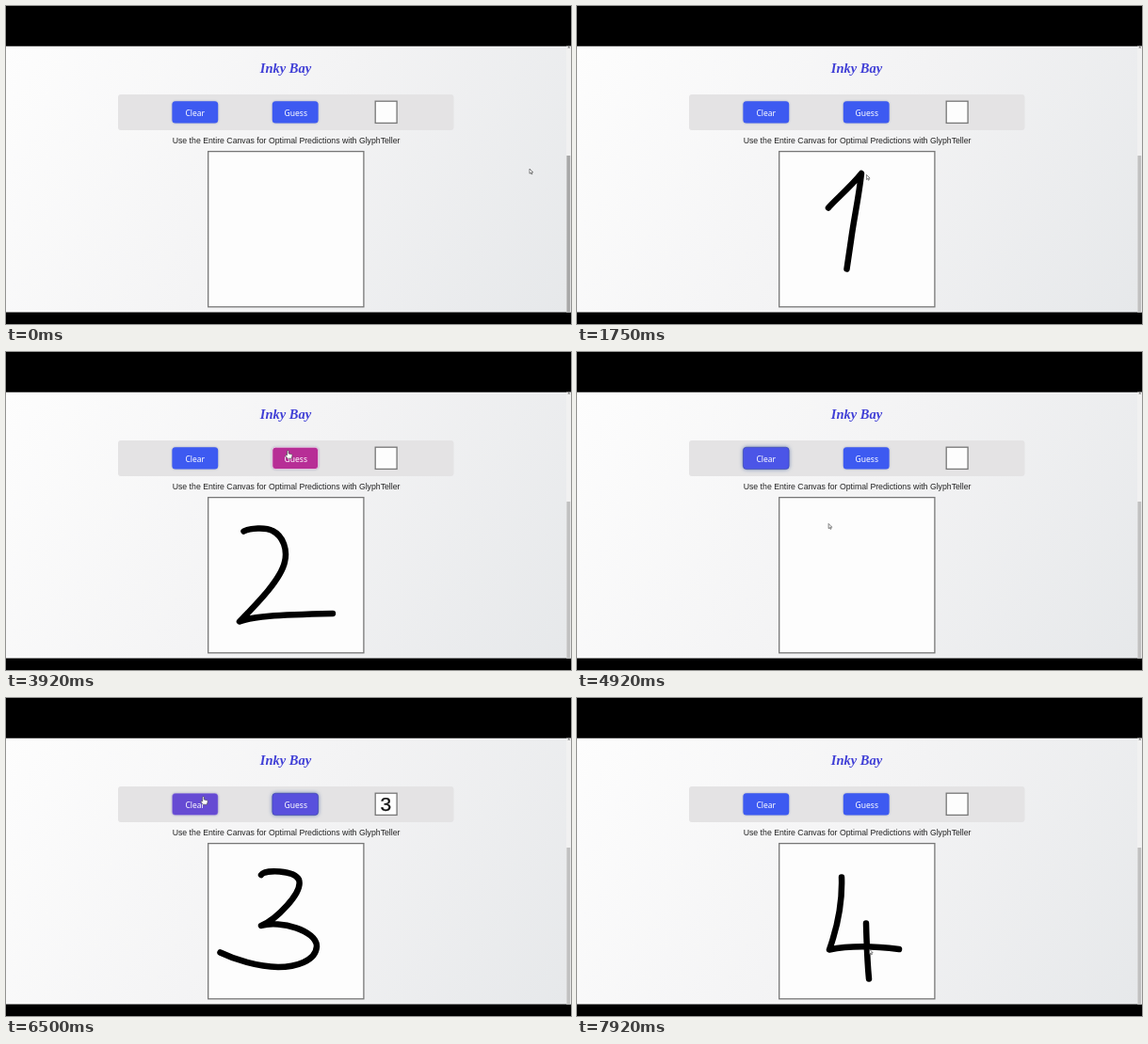
These frames come from a looping animation (600 by 338 pixels, 8000 ms). An HTML page:

```html
<!DOCTYPE html>
<html lang="en">
<head>
<meta charset="utf-8">
<title>Digit drawing pad</title>
<style>
html, body { margin: 0; width: 100%; height: 100%; overflow: hidden; background: #000; }
#stage { position: relative; width: 600px; height: 338px; overflow: hidden; }
#page { position: absolute; top: 42px; width: 600px; height: 284px; background: linear-gradient(120deg, #fdfdfd, #f3f3f4 50%, #e6e8ea); }
svg { position: absolute; left: 0; top: 0; }
.box { fill: #fdfdfd; stroke: #777; stroke-width: 1.3; }
.label { font: 8.5px "Noto Sans", "Open Sans", sans-serif; fill: #fff; text-anchor: middle; }
.sans { font: 8.73px "Liberation Sans", Arial, sans-serif; fill: #222; }
.title { font: italic bold 14.5px "Liberation Serif", serif; fill: #403fd6; text-anchor: middle; }
#digit { font-size: 21px; fill: #111; stroke: #111; stroke-width: .25; text-anchor: middle; }
.pen { fill: none; stroke: #000; stroke-width: 6.5; stroke-linecap: round; stroke-linejoin: round; }
#cursor path { fill: #fff; stroke: #444; stroke-width: .65; stroke-linejoin: round; }
</style>
</head>
<body>
<div id="stage">
  <div id="page"></div>
  <svg width="600" height="338" viewBox="0 0 600 338">
    <path d="M0 0H600V42.7H0ZM0 325.4H600V338H0Z"/>
    <rect x="595" y="42.7" width="5" height="282.7" fill="#f1f1f1"/>
    <rect id="thumb" x="595.4" y="159" width="3.8" height="166.4"/>
    <path d="M596.3 44.6l1.5-1.6 1.5 1.6z" fill="#555"/>
    <rect x="119" y="94" width="356.5" height="38" rx="3" fill="#e4e3e4"/>
    <rect id="clear" x="176.4" y="101.2" width="48.8" height="23.4" rx="3.5"/>
    <rect id="guess" x="282.8" y="101.2" width="48.8" height="23.4" rx="3.5"/>
    <rect class="box" x="392.2" y="101.2" width="22.9" height="23.2"/>
    <rect class="box" x="214.7" y="154.6" width="165.2" height="165.2"/>
    <text class="title" x="297" y="71">Inky Bay</text>
    <text class="label" x="200.8" y="116.7">Clear</text>
    <text class="label" x="307.8" y="116.7">Guess</text>
    <text class="sans" x="176.7" y="145.7">Use the Entire Canvas for Optimal Predictions with GlyphTeller</text>
    <text class="sans" id="digit" x="403.3" y="120.4"></text>
    <g id="ink"></g>
    <g id="cursor">
      <path id="arrow" d="M0 0V5.2L1.2 4.1 2 5.9 2.9 5.5 2.1 3.8H3.7Z"/>
      <path id="hand" d="M-.8 0Q0-1 .8 0V2.8L4.1 3.6Q4.9 4 4.6 5.2L3.9 8H-.4L-2.7 4.8Q-2.2 3.7-.8 4.6Z"/>
    </g>
  </svg>
</div>
<script>
const LOOP = 8000, STEP = 1000 / 12, FADE = 250, TRAVEL = 400, LINGER = 60, REPLY = 80;
const BLUE = [61, 90, 241], PINK = [224, 31, 120];
const $ = id => document.getElementById(id);
const clamp = v => Math.min(1, Math.max(0, v));
const smooth = v => v * v * (3 - 2 * v);

const rest = (start, end, x, y) => ({ start, end, at: () => ({ x, y }) });

function tap(button, time, digit = "") {
  const { x, y } = $(button).getBBox();
  return { ...rest(time, time + LINGER, x + 16.5, y + 4), button, digit };
}

function draw(start, end, d) {
  const path = document.createElementNS("http://www.w3.org/2000/svg", "path");
  path.setAttribute("d", d);
  path.setAttribute("class", "pen");
  $("ink").append(path);
  const length = path.getTotalLength();
  return { start, end, path, length, at: k => path.getPointAtLength(length * k) };
}

// What the visitor does, in order; the pointer travels in between
const actions = [
  rest(0, 90, 556, 173),
  draw(900, 1530, "M267 214.5C273 207 290 193 302 178C299 205 294 226 291 249L286.5 279.5"),
  tap("guess", 2120, "1"),
  tap("clear", 2730),
  draw(2960, 3420, "M252.5 190.5C259 187 276 186 283 190C295 196 299 211 296 223C292 242 265 269 248 286.5C262 281 285 279.5 347 278"),
  tap("guess", 4170, "2"),
  tap("clear", 4520),
  draw(5000, 5480, "M271 188C275 182 306 183 311 193C316 207 286 236 271 242C291 236 330 247 330 264C329 280 307 286 289 286C267 285.5 243 278 227.5 270.5"),
  tap("guess", 6140, "3"),
  tap("clear", 6740),
  draw(7040, 7500, "M281 190.5C282 218 277 242 268 267.5C290 263 318 264 342 267"),
  draw(7650, 7840, "M307 239.5C307.5 258 308 278 310 298.5"),
  rest(7910, LOOP, 310.5, 267)
];

const latest = t => actions.findLastIndex(a => a.start <= t);

function pointerAt(t) {
  const i = Math.max(0, latest(t)), now = actions[i], next = actions[i + 1];
  if (t < now.end || !next) return now.at(clamp((t - now.start) / (now.end - now.start)));
  const from = now.at(1), to = next.at(0);
  const k = smooth(clamp((t - now.end) / Math.min(TRAVEL, next.start - now.end)));
  const dx = to.x - from.x, dy = to.y - from.y;
  const bow = .08 * Math.abs(dy) * Math.sin(Math.PI * k);
  return { x: from.x + dx * k + bow, y: from.y + dy * k };
}

function isOver(button, t) {
  const { x, y } = pointerAt(t), b = $(button).getBBox();
  return x > b.x && x < b.x + b.width && y > b.y && y < b.y + b.height;
}

// The share of the last FADE ms spent on the button gives its colour
function hoverAmount(button, t) {
  const samples = 12;
  let hits = 0;
  for (let i = 0; i < samples; i++) hits += isOver(button, t - FADE * i / samples);
  return hits / samples;
}

function drawButton(id, t, focused) {
  const k = hoverAmount(id, t), style = $(id).style;
  style.fill = `rgb(${BLUE.map((c, i) => Math.round(c + (PINK[i] - c) * k))})`;
  style.stroke = focused ? "rgba(35,50,150,.45)" : `rgba(246,232,240,${k})`;
  style.filter = focused
    ? "drop-shadow(0 0 2px rgba(35,75,150,.6))"
    : "drop-shadow(0 .8px 1.2px rgba(50,70,130,.35))";
}

function render(t) {
  const now = actions[latest(t)];
  for (const id of ["clear", "guess"]) drawButton(id, t, now.button === id);
  $("digit").textContent = actions[Math.max(0, latest(t - REPLY))].digit || "";
  $("thumb").style.fill = t < 240 ? "#a8a8a8" : "#c1c1c1";

  const wiped = actions.findLast(a => a.button === "clear" && a.start <= t);
  for (const a of actions.filter(a => a.path)) {
    const k = clamp((t - a.start) / (a.end - a.start));
    const visible = t >= a.start && !(wiped && wiped.start > a.start);
    a.path.style.display = visible ? "" : "none";
    a.path.style.strokeDasharray = k < 1 ? `${a.length * k + .01} ${a.length + 20}` : "none";
  }

  const { x, y } = pointerAt(t), over = isOver("clear", t) || isOver("guess", t);
  $("cursor").setAttribute("transform", `translate(${x} ${y})`);
  $("hand").style.display = over ? "" : "none";
  $("arrow").style.display = over ? "none" : "";
}

const start = performance.now();
function tick(now) {
  const t = Math.max(0, now - start) % LOOP;
  render(Math.min(LOOP - STEP, Math.floor((t + 4) / STEP) * STEP));
  requestAnimationFrame(tick);
}
render(0);
requestAnimationFrame(tick);
</script>
</body>
</html>
```
